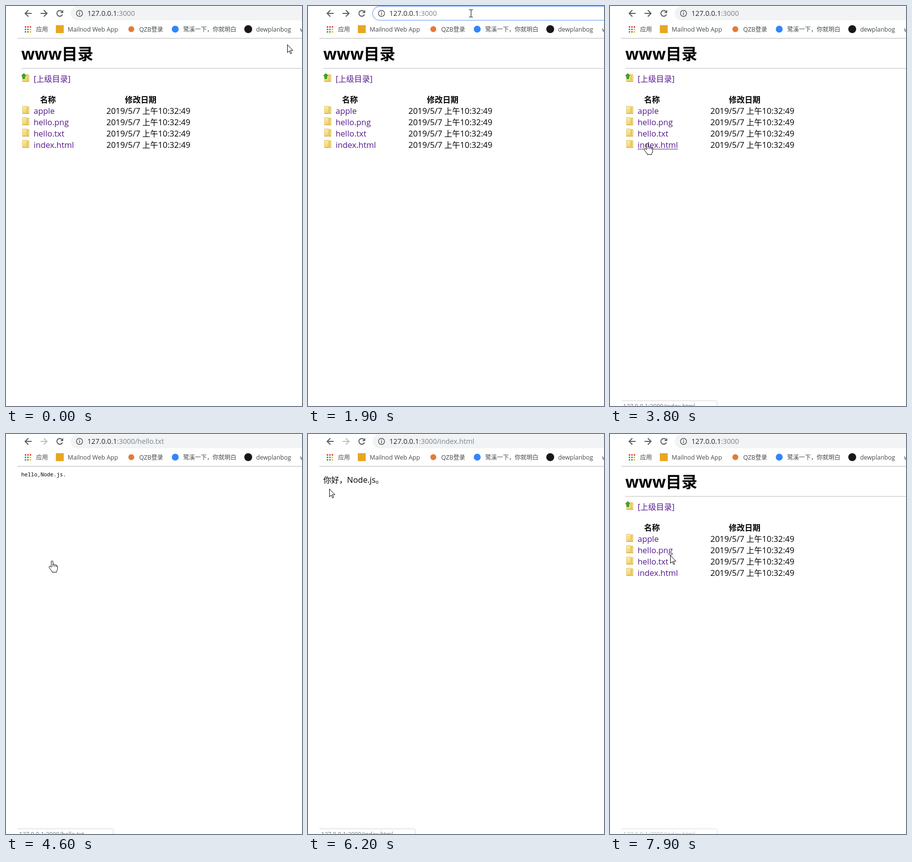
These frames come from a looping animation (600 px wide and 812 px high, 8000 ms). An HTML page with a canvas:

```html
<!DOCTYPE html>
<html lang="zh-CN">
<head>
<meta charset="utf-8">
<style>
html, body { margin: 0; width: 100%; height: 100%; overflow: hidden; background: #fff; }
canvas { display: block; }
</style>
</head>
<body>
<canvas id="stage" width="600" height="812"></canvas>
<script>
const ctx = document.getElementById('stage').getContext('2d');
const LOOP = 8000;
const SANS = '"Open Sans", "Noto Sans CJK SC", "Noto Sans CJK", sans-serif';
const CJK = '"Noto Sans CJK SC", "Noto Sans CJK", sans-serif';
const LINK = '#551a8b', ICON = '#5a5d61', PILL = '#f1f3f4', HOST = '127.0.0.1';

// Time, pointer shape, tip position
const POINTER = [
  [0, 'arrow', 570, 78], [100, 'arrow', 456, 104], [200, 'arrow', 376, 68],
  [300, 'arrow', 344, 42], [400, 'beam', 330, 15],
  [3200, 'arrow', 155, 258], [3300, 'arrow', 60, 324], [3400, 'arrow', 60, 346],
  [3700, 'hand', 75, 278], [3900, 'hand', 93, 257],
  [4800, 'arrow', 68, 230], [4900, 'arrow', 100, 190], [5000, 'arrow', 82, 105],
  [5100, 'arrow', 63, 66], [5200, 'arrow', 45, 18],
  [5600, 'hand', 76, 269], [5700, 'hand', 84, 289],
  [6100, 'arrow', 45, 168], [6200, 'arrow', 43, 111], [6300, 'arrow', 44, 19],
  [6900, 'arrow', 60, 46], [7000, 'arrow', 68, 130], [7100, 'arrow', 72, 200],
  [7200, 'hand', 84, 278], [7500, 'hand', 108, 276], [7700, 'arrow', 122, 246]
];
const PAGES = [[0, ''], [4600, '/hello.txt'], [5500, ''], [6000, '/index.html'], [6800, '']];
const HOVERED = [[0, ''], [3700, 'index.html'], [3900, 'hello.txt'], [4600, ''],
  [5600, 'hello.txt'], [5700, 'index.html'], [6000, ''], [7200, 'index.html'], [7700, '']];
// Start, end of solid text, end, link name
const STATUS = [[3800, 3900, 3900, 'index.html'], [3900, 4800, 5500, 'hello.txt'],
  [5800, 6300, 6800, 'index.html'], [7300, 7600, 8200, 'index.html']];
const FILES = ['apple', 'hello.png', 'hello.txt', 'index.html'];
// Title and path of each address suggestion
const SUGGESTIONS = [['', ''], ['', '/apple'], ['登录 - ', '/apple/login.html'],
  ['', '/apple/login'], ['首页 - ', '/index.html'], ['', '/hello.txt']];

const during = (t, from, to) => t >= from && t < to;
const current = (steps, t) => steps.filter(step => step[0] <= t).pop();

// Draws mixed Latin and Chinese runs, returns the right edge
function text(str, x, y, size, color = '#000', weight = 400) {
  ctx.fillStyle = color;
  for (const run of str.match(/[\u2e80-\uffff]+|[^\u2e80-\uffff]+/g)) {
    const chinese = run.charCodeAt(0) > 0x2e80;
    ctx.font = `${weight} ${chinese ? size : size * 1.03}px ${chinese ? CJK : SANS}`;
    ctx.fillText(run, x, y);
    x += ctx.measureText(run).width;
  }
  return x;
}

function rect(x, y, w, h, color) {
  ctx.fillStyle = color;
  ctx.fillRect(x, y, w, h);
}

function round(x, y, w, h, r, fill, stroke, lineWidth = 1) {
  ctx.beginPath();
  ctx.roundRect(x, y, w, h, r);
  paint(null, fill, stroke, lineWidth);
}

function disc(x, y, r, color) {
  ctx.beginPath();
  ctx.arc(x, y, r, 0, 7);
  paint(null, color);
}

function paint(path, fill, stroke, lineWidth = 1) {
  const args = path ? [path] : [];
  ctx.lineWidth = lineWidth;
  if (fill) { ctx.fillStyle = fill; ctx.fill(...args); }
  if (stroke) { ctx.strokeStyle = stroke; ctx.stroke(...args); }
}

function at(x, y, draw) {
  ctx.save();
  ctx.translate(x, y);
  draw();
  ctx.restore();
}

const SHAPES = {
  back: new Path2D('M7 0H-6M.3-6.5L-6.2 0L.3 6.5'),
  head: new Path2D('M7-7V-.8H.8Z'),
  up: new Path2D('M4.5 0L9 5H6.5V10.5H2.5V5H0Z'),
  arrow: new Path2D('M.5.5V16.5L4.2 13L6.8 18.8L9 17.9L6.4 12.2H11.6Z'),
  beam: new Path2D('M-3.5-7.5H-1Q.5-7.5.5-6Q.5-7.5 2-7.5H4M.5-6V6M-3.5 7.5H-1Q.5 7.5.5 6Q.5 7.5 2 7.5H4'),
  hand: new Path2D('M-1.2 13.5V2Q-1 .5.5.5T2.2 2V7.5Q5 6.6 5.6 8.5Q8.2 7.8 8.8 9.7Q11.5 9.4 11.5 12V16.5Q11.5 19 9.5 21.5V23.5H.5V22Q-3 18-5.5 14Q-6.3 12-4.5 11.3Q-3 11.2-1.2 13.5Z'),
  knuckles: new Path2D('M2.2 7.5V12M5.6 8.5V12.5M8.8 9.7V13')
};

function infoIcon(y) {
  ctx.beginPath();
  ctx.arc(149, y, 6.2, 0, 7);
  paint(null, null, ICON, 1.5);
  rect(148.2, y - 1, 1.6, 4.4, ICON);
  rect(148.2, y - 3.6, 1.6, 1.6, ICON);
}

function folder(y) {
  const shade = ctx.createLinearGradient(33, y, 44, y + 15);
  shade.addColorStop(0, '#fdf2b4');
  shade.addColorStop(1, '#efcb5c');
  round(43.5, y + 1.5, 3, 13, .5, '#f7e08c', '#dcb650');
  round(33.5, y + .5, 9, 14, .5, shade, '#e3c264');
  rect(33, y + 15, 14, 1, '#d2a944');
}

function address(page) {
  infoIcon(15);
  const end = text(HOST, 165, 20, 13.8, '#26292c');
  return text(':3000' + page, end, 20, 13.8, '#80868b');
}

function toolbar(t, page) {
  if (during(t, 5200, 5700) || during(t, 6300, 6900)) disc(45, 15, 14, '#dfe0e2');
  at(45, 15, () => paint(SHAPES.back, null, ICON, 2));
  at(77, 15, () => {
    ctx.scale(-1, 1);
    paint(SHAPES.back, null, page ? '#bdbfc1' : ICON, 2);
  });
  at(109, 15, () => {
    ctx.beginPath();
    ctx.arc(0, 0, 5.8, .35, 5.45);
    paint(null, null, ICON, 2);
    paint(SHAPES.head, ICON);
  });

  const focused = during(t, 600, 2100);
  if (focused) round(131, 1, 520, 28, 14, '#fff', '#a8c7fa', 2);
  else round(131, 1, 520, 28, 14, PILL);
  address(page);
  if (during(t, 600, 1400)) {
    rect(165, 5, 97, 20, '#3390ff');
    text(HOST + ':3000', 165, 20, 13.8, '#fff');
  }
  if (during(t, 1400, 1900)) rect(261, 5, 1, 19, '#000');
}

function bookmarks(t) {
  if (during(t, 300, 400)) round(329, 33, 144, 28, 14, PILL);
  if (during(t, 6900, 7000)) round(31, 33, 60, 28, 14, PILL);
  const dots = ['#ea4335', '#ea4335', '#ea4335', '#34a853', '#4285f4', '#fbbc05', '#34a853', '#34a853', '#fbbc05'];
  dots.forEach((color, i) => rect(38 + i % 3 * 5, 41 + Math.floor(i / 3) * 5, 3, 3, color));
  rect(101, 39, 16, 16, '#e6a723');
  disc(254, 47, 6, '#e57a38');
  disc(343, 47, 7, '#3385ff');
  disc(491, 47, 8, '#191717');
  const labels = [['应用', 61], ['Mailnod Web App', 125], ['QZB登录', 270],
    ['鹭溪一下，你就明白', 359], ['dewplanbog', 507], ['w', 596]];
  for (const [label, x] of labels) text(label, x, 52, 12, '#45484b');
  rect(23, 65, 577, 1, '#b4b4b4');
}

function directory(t) {
  const hovered = current(HOVERED, t)[1];
  const pressed = during(t, 4400, 4600) || during(t, 5900, 6000);
  const heading = text('www', 31, 109, 31, '#000', 700);
  text('目录', heading, 109, 32, '#000', 700);
  rect(31, 126, 569, 1, '#bcbcbc');
  folder(138);
  at(31.5, 137, () => paint(SHAPES.up, '#35b221', '#16800e'));
  text('[上级目录]', 56, 154, 16, LINK);
  text('名称', 69, 196, 16, '#000', 700);
  text('修改日期', 241, 196, 16, '#000', 700);
  FILES.forEach((name, i) => {
    const y = 219 + i * 23, active = name === hovered;
    const color = active && pressed ? '#f00' : LINK;
    folder(y - 16);
    const end = text(name, 56, y, 16, color);
    if (active) rect(56, y + 2, end - 56, 1, color);
    text('2019/5/7 上午10:32:49', 203.5, y, 16);
  });
}

function content(t, page) {
  if (page === '/hello.txt') {
    ctx.fillStyle = '#000';
    ctx.font = '10.83px "Noto Sans Mono", monospace';
    ctx.fillText('hello,Node.js.', 31, 86);
  } else if (page) text('你好，Node.js。', 31, 99, 16);
  else directory(t);
}

function suggestions() {
  ctx.save();
  ctx.shadowColor = 'rgba(0,0,0,.3)';
  ctx.shadowBlur = 12;
  ctx.shadowOffsetY = 2;
  round(123, -30, 600, 297, 14, '#fff');
  ctx.restore();
  address('');
  rect(123, 33, 477, 37, '#e8eaed');
  SUGGESTIONS.forEach(([title, path], i) => {
    const y = 51 + i * 37;
    infoIcon(y);
    const start = title ? text(title, 177, y + 5, 13.8, '#26292c') : 177;
    text(HOST + ':3000' + path, start, y + 5, 13.8, '#1a73e8');
  });
}

function statusBar(t) {
  const status = STATUS.find(([from, , to]) => during(t, from, to));
  if (!status) return;
  const [, solid, end, name] = status;
  const alpha = t < solid ? 1 : 1 - (t - solid) / (end - solid);
  ctx.save();
  ctx.globalAlpha = (1 + alpha) / 2;
  round(22.5, 801.5, 195, 20, [0, 4, 0, 0], '#fff', '#d2d2d2');
  rect(0, 800, 23, 12, '#fff');
  ctx.globalAlpha = alpha;
  text(`${HOST}:3000/${name}`, 26.5, 817, 11.7, '#75787b');
  ctx.restore();
}

function pointer(t) {
  const [, kind, x, y] = current(POINTER, t);
  at(x, y, () => {
    if (kind === 'beam') return paint(SHAPES.beam, null, '#000');
    ctx.lineJoin = 'round';
    paint(SHAPES[kind], '#fff', '#000');
    if (kind === 'hand') paint(SHAPES.knuckles, null, '#000');
  });
}

function frame() {
  const t = performance.now() % LOOP;
  const page = current(PAGES, t)[1];
  rect(0, 0, 600, 812, '#fff');
  toolbar(t, page);
  bookmarks(t);
  content(t, page);
  if (during(t, 2100, 2400)) suggestions();
  statusBar(t);
  pointer(t);
  requestAnimationFrame(frame);
}
frame();
</script>
</body>
</html>
```
